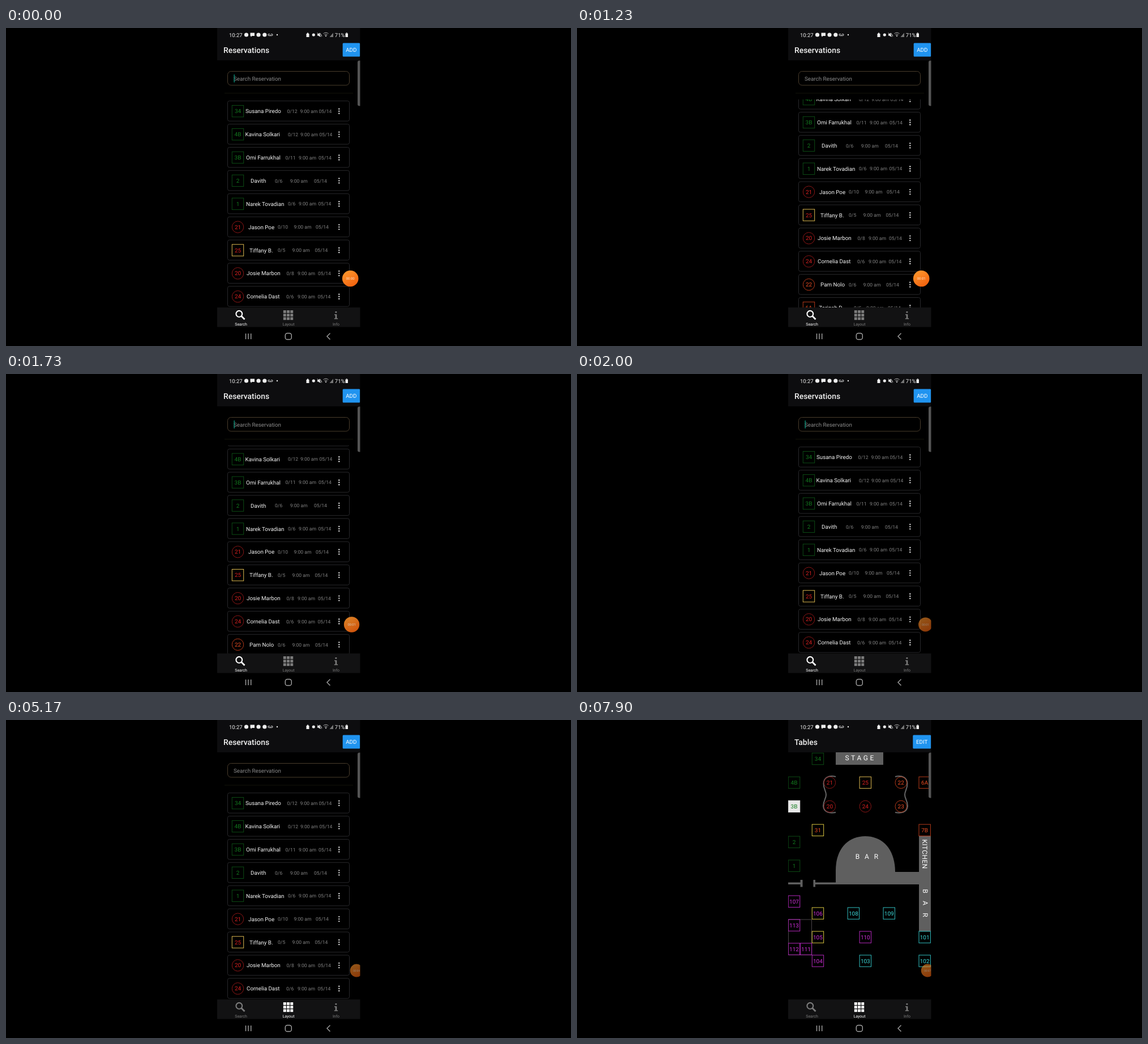
An HTML page that plays this animation: 998x561 px, repeating every 8000 ms.

```html
<!DOCTYPE html>
<html lang="en">
<head>
<meta charset="utf-8">
<title>Reservations</title>
<style>
html, body { margin: 0; width: 100%; height: 100%; overflow: hidden; background: #000; }
svg { display: block; width: 998px; height: 561px; font-family: Roboto, sans-serif; text-rendering: geometricPrecision; }
.off { --tab: #7b7b7b; }
.on { --tab: #fff; }
</style>
</head>
<body>
<svg id="stage" viewBox="0 0 998 561">
  <defs>
    <clipPath id="phone"><rect x="373" width="252.5" height="561"/></clipPath>
    <clipPath id="listClip"><rect x="373" y="126" width="252" height="367"/></clipPath>
    <clipPath id="mapClip"><rect x="373" y="57" width="252" height="436"/></clipPath>
    <linearGradient id="orange" x2=".6" y2="1">
      <stop stop-color="#ff9c30"/><stop offset="1" stop-color="#f26410"/>
    </linearGradient>
  </defs>
  <g clip-path="url(#phone)">
    <rect x="373" width="253" height="57" fill="#0d0d0f"/>
    <g id="status"></g>
    <g id="listPage">
      <rect x="391.5" y="76.5" width="215" height="24.500" rx="6" fill="none" stroke="#493c2b"/>
      <rect id="caret" x="402.5" y="82" width="1.3" height="14" fill="#0b9a80"/>
      <path d="M386 115H613" stroke="#12140a"/>
      <g clip-path="url(#listClip)"><g id="rows"></g></g>
    </g>
    <g id="mapPage"><g id="map" clip-path="url(#mapClip)"></g></g>
    <path d="M626 57.5h-2a3 3 0 0 0-3 3v74a3 3 0 0 0 3 3h2z" fill="#555"/>
    <rect x="373" y="493" width="253" height="34.5" fill="#121213"/>
    <g id="tabs"></g>
    <g fill="none" stroke="#a4a4a4" stroke-width="1.4">
      <path d="M423.5 539v10M428 539v10M432.700 539v10"/>
      <rect x="493.300" y="538.500" width="11" height="11" rx="3.600"/>
      <path d="M572.500 538.500l-5.500 5.500 5.500 5.500"/>
    </g>
    <g id="orb">
      <circle r="14.3" fill="url(#orange)"/>
    </g>
  </g>
</svg>
<script>
const $ = id => document.getElementById(id);
const NS = 'http://www.w3.org/2000/svg';

function el(parent, tag, attrs, content) {
  const node = document.createElementNS(NS, tag);
  for (const k in attrs) node.setAttribute(k, attrs[k]);
  if (content !== undefined) node.textContent = content;
  parent.appendChild(node);
  return node;
}
const text = (parent, x, y, size, fill, str, extra) =>
  el(parent, 'text', { x, y, 'font-size': size, fill, ...extra }, str);
const mid = { 'text-anchor': 'middle' };

// Text and border colour of each kind of table
const KINDS = {
  g: ['#127a1e', '#0c4a14'], r: ['#d82020', '#8c1717'], y: ['#d82020', '#dcb850'],
  o: ['#e84c22', '#b43a1a'], w: ['#e84c22', '#d8c440'], p: ['#d02ed8', '#b428bc'],
  q: ['#d02ed8', '#d8c440'], c: ['#3cdcdc', '#30bcbe'], s: ['#0f7a1a', '#e8e8e8']
};
function table(parent, x, y, label, kind, round) {
  const [ink, line] = KINDS[kind];
  const look = { fill: kind === 's' ? '#e8e8e8' : 'none', stroke: line };
  if (round) el(parent, 'circle', { cx: x, cy: y, r: 10.2, ...look });
  else el(parent, 'rect', { x: x - 10.2, y: y - 10.2, width: 20.4, height: 20.4, ...look });
  text(parent, x, y + 3.6, 10, ink, label, mid);
}

function drawStatus() {
  const g = $('status'), white = '#eee', grey = '#777';
  const dot = (cx, r) => el(g, 'circle', { cx, cy: 12, r, fill: white });
  const path = (d, extra) => el(g, 'path', { d, fill: white, ...extra });
  const line = { fill: 'none', stroke: white };
  text(g, 394, 15.5, 9.5, white, '10:27');
  dot(424.5, 3.6);
  path('M431.500 8.500h7.500v5.500h-4.500l-2 2v-2h-1z');
  dot(446, 3.6);
  dot(456.8, 3.6);
  path('M466 12a1.500 1.500 0 1 0-1.500 1.500h5a1.500 1.500 0 1 0-1.500-1.500', line);
  dot(479, 1.2);
  path('M530.500 10h5v6h-5zM531.800 8.500h2.400v1.500h-2.400z');
  dot(543.3, 2.6);
  path('M550 10.500h2l2.500-2.300v7.600l-2.500-2.300h-2z');
  path('M555 9.500l3 5M550 8.500l6.500 7', line);
  path('M560.500 10a6.500 6.500 0 0 1 9 0M562.300 12.200a4 4 0 0 1 5.400 0', { ...line, stroke: '#aaa' });
  path('M563.600 13.600a2.200 2.200 0 0 1 2.800 0l-1.400 2z');
  path('M571.500 16l6.500-7.500v7.500z', { fill: grey });
  text(g, 580.8, 15.5, 9.5, white, '71%');
  path('M599.500 9.500h4.500v6.500h-4.500zM600.700 8.300h2v1h-2z');
}

function header(page, title, label, x) {
  text(page, 384, 44, 13.9, '#f2f2f2', title, { 'font-weight': 500 });
  el(page, 'rect', { x, y: 26.5, width: 625.3 - x, height: 24, rx: 1.5, fill: '#2094f0' });
  text(page, (x + 625) / 2, 42.3, 9.8, '#fff', label, mid);
}

// label, kind (upper case = round), name, party, then x of name, party, time and date
const ROWS = [
  ['34', 'g', 'Susana Piredo', '0/12', 423, 496.5, 519.5, 552.5],
  ['4B', 'g', 'Kavina Solkari', '0/12', 422.5, 498, 520, 553.5],
  ['3B', 'g', 'Omi Farrukhal', '0/11', 424, 493.5, 517, 552],
  ['2', 'g', 'Davith', '0/6', 432, 475, 501.8, 544],
  ['1', 'g', 'Narek Tovadian', '0/6', 424, 498, 517, 551.5],
  ['21', 'R', 'Jason Poe', '0/10', 428, 480, 508.5, 547],
  ['25', 'y', 'Tiffany B.', '0/5', 430, 480, 505.5, 545.5],
  ['20', 'R', 'Josie Marbon', '0/8', 425, 495.5, 515, 551],
  ['24', 'R', 'Cornelia Dast', '0/6', 425, 495, 515, 550.5],
  ['22', 'O', 'Pam Nolo', '0/6', 430, 480, 505.5, 546],
  ['6A', 'o', 'Zarineh D.', '0/5', 427, 489, 511, 549],
  ['23', 'O', 'Lena Orvel', '0/6', 428, 480, 508.5, 547],
  ['7B', 'o', 'Tobin Marsk', '0/4', 426, 489, 511, 549],
  ['31', 'w', 'Nadia Celvo', '0/4', 426, 489, 511, 549]
];
function drawList() {
  const page = $('listPage');
  header(page, 'Reservations', 'ADD', 594.7);
  text(page, 402, 92.6, 9.8, '#8a8a8a', 'Search Reservation');
  page.appendChild($('caret'));
  ROWS.forEach(([label, kind, name, party, xn, xp, xt, xd], i) => {
    const y = 146.7 + i * 40.88, g = $('rows'), low = kind.toLowerCase();
    el(g, 'rect', { x: 391.5, y: y - 18, width: 215, height: 35.5, rx: 3, fill: 'none', stroke: '#28282b' });
    table(g, 409.5, y, label, low, kind !== low);
    text(g, xn, y + 3.6, 9.8, '#f4f4f4', name);
    [[xp, party], [xt, '9:00 am'], [xd, '05/14']].forEach(([x, s]) => text(g, x, y + 3.2, 8.6, '#808080', s));
    for (const d of [-4, 0, 4]) el(g, 'circle', { cx: 588.3, cy: y + d, r: 1.2, fill: '#ddd' });
  });
}

// label:kind:column:row on a 21 px grid
const TABLES = `34:g:2:0 4B:g:0:2 21:R:3:2 25:y:6:2 22:O:9:2 6A:o:11:2 3B:s:0:4 20:R:3:4 24:R:6:4
  23:O:9:4 31:w:2:6 7B:o:11:6 2:g:0:7 1:g:0:9 107:p:0:12 106:q:2:13 108:c:5:13 109:c:8:13 113:p:0:14
  105:q:2:15 110:p:6:15 101:c:11:15 112:p:0:16 111:p:1:16 104:p:2:17 103:c:6:17 102:c:11:17`;
function drawMap() {
  const g = $('map'), wall = '#5f5f5f', cell = 20.97;
  header($('mapPage'), 'Tables', 'EDIT', 593.3);
  const shape = (d, extra) => el(g, 'path', { d, fill: wall, ...extra });
  shape('M457 57h84v22h-84z');
  shape('M457 290V266C457 228 478 205 509 205S562 228 562 268H604V205H625V373H604V290Z');
  shape('M373 286.500h21.500v-4.500h4v12.500h-4v-4.500h-21.500zM457 286.500h-36v-4.500h-3.600v12.500h3.600v-4.500h36z');
  const sofa = 'M457 100C444 97 436 102 435.500 112C435.500 122 440 125 440 132S435 142 435 152C436 163 446 165 457 163';
  const line = { fill: 'none', stroke: '#666', 'stroke-width': 2 };
  shape(sofa, line);
  shape(sofa, { ...line, transform: 'translate(1019 0) scale(-1 1)' });
  shape('M373.500 352H414.500V414.500H373.500Z', { fill: 'none', stroke: '#4a4548' });
  text(g, 500.7, 71, 12, '#fff', 'STAGE', { ...mid, 'letter-spacing': 3.6 });
  [...'BAR'].forEach((c, i) => {
    text(g, 495.5 + i * 16.5, 245, 12, '#fff', c, mid);
    text(g, 0, 4.3, 12, '#fff', c, { ...mid, transform: `translate(615 ${302 + i * 21}) rotate(90)` });
  });
  text(g, 0, 4.3, 12, '#fff', 'KITCHEN', { ...mid, 'letter-spacing': .4, transform: 'translate(614 236.500) rotate(90)' });
  for (const item of TABLES.split(/\s+/)) {
    const [label, kind, col, row] = item.split(':'), low = kind.toLowerCase();
    table(g, 383.5 + col * cell, 68.5 + row * cell, label, low, kind !== low);
  }
}

function drawTabs() {
  const tint = 'var(--tab)';
  const tab = (id, x, label) => {
    const g = el($('tabs'), 'g', { id });
    text(g, x, 524.8, 7, tint, label, mid);
    return g;
  };
  const search = tab('searchTab', 415, 'Search');
  el(search, 'circle', { cx: 411.8, cy: 504.3, r: 5.4, fill: 'none', stroke: tint, 'stroke-width': 2.1 });
  el(search, 'path', { d: 'M415.800 508.300L421.500 514', stroke: tint, 'stroke-width': 2.8 });
  const grid = tab('layoutTab', 499, 'Layout');
  for (let i = 0; i < 9; i++)
    el(grid, 'rect', { x: 489.8 + i % 3 * 6.2, y: 498 + (i / 3 | 0) * 6.1, width: 5, height: 4.9, fill: tint });
  const info = tab('infoTab', 583, 'Info');
  el(info, 'path', { d: 'M581.500 500h2.800v2.600h-2.800zM580 505h4.300v7h1.800v1.500h-6.300v-1.500h1.900v-5.500h-1.700z', fill: tint });
  info.setAttribute('class', 'off');
}

drawStatus();
drawList();
drawMap();
drawTabs();
const clock = text($('orb'), 0, 2.2, 6, '#ffe6d0', '', mid);

// Steps of [ms, value], linear in between
const SCROLL = [[30, 0], [180, 70], [350, 135], [630, 180], [800, 180], [1000, 100],
  [1120, 72], [1230, 62], [1570, 59], [1640, 57], [1820, 18], [1970, 0]];
const DOCK = [[1600, 0], [2000, .66], [2400, 1]];
function at(steps, t) {
  const i = steps.findIndex(s => s[0] > t);
  if (i === 0) return steps[0][1];
  if (i < 0) return steps[steps.length - 1][1];
  const [t0, a] = steps[i - 1], [t1, b] = steps[i];
  return a + (b - a) * (t - t0) / (t1 - t0);
}

const LOOP = 8000, BLINK = 1100, TAP = 4970, SWITCH = 5530;
const show = (id, on) => $(id).setAttribute('visibility', on ? 'visible' : 'hidden');

function render(t) {
  const map = t >= SWITCH, tapped = t >= TAP;
  show('listPage', !map);
  show('mapPage', map);
  show('caret', !map && t < 4430 && (t + BLINK - 30) % BLINK >= BLINK / 2);
  $('rows').setAttribute('transform', `translate(0 ${-at(SCROLL, t)})`);
  $('searchTab').setAttribute('class', tapped ? 'off' : 'on');
  $('layoutTab').setAttribute('class', tapped ? 'on' : 'off');

  const dock = at(DOCK, t);
  $('orb').setAttribute('transform', `translate(${608.2 + dock * 11} 442) scale(${1 - dock * .2})`);
  $('orb').setAttribute('opacity', 1 - Math.min(1, dock * 1.5) * .42);
  clock.textContent = '00:0' + Math.floor(t / BLINK);
}

const start = performance.now();
function tick(now) {
  render(Math.max(0, now - start) % LOOP);
  requestAnimationFrame(tick);
}
render(0);
requestAnimationFrame(tick);
</script>
</body>
</html>
```
